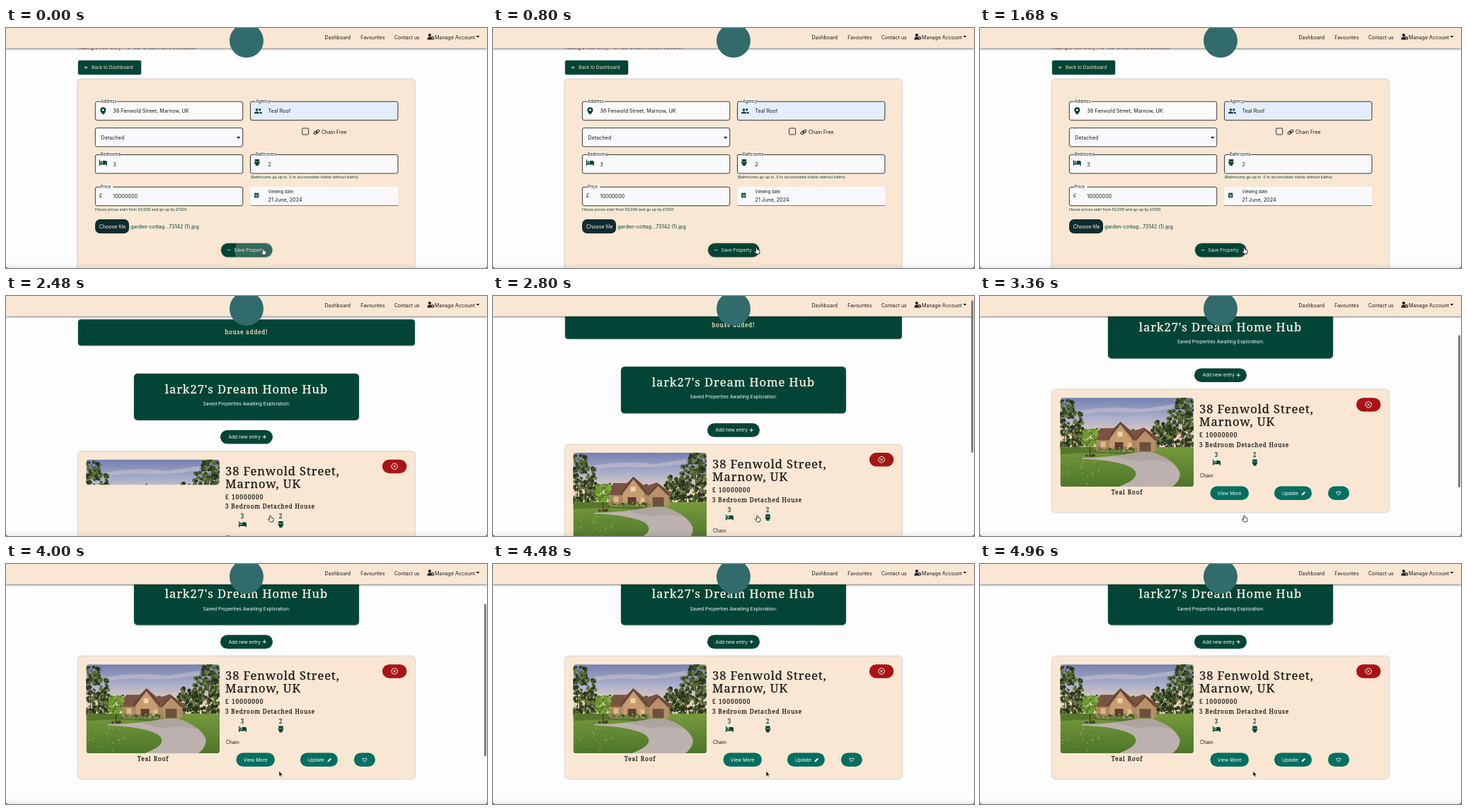
Recreate the animation shown at these times as an HTML page. Size 680 by 340 pixels, loop 5.04 s.

```html
<!DOCTYPE html>
<html lang="en">
<head>
<meta charset="utf-8">
<title>Property form to dashboard</title>
<style>
  html, body { margin: 0; width: 100%; height: 100%; overflow: hidden; background: #fdfdfd; }
  svg { display: block; width: 100vw; height: 100vh; }
  text { font-family: Inter, Roboto, sans-serif; white-space: pre; }
  .serif { font-family: "Noto Serif", serif; stroke-width: .25; }
  .raised { filter: drop-shadow(0 .7px .8px #0006); }
</style>
</head>
<body>
<svg id="stage" viewBox="0 0 680 340"></svg>
<script>
const LOOP = 5040, SWAP = 1920;
const GREEN = '#024536', TEAL = '#046f60', PEACH = '#f9e7d3', INK = '#181818', CREAM = '#fbe3c6';

const rect = (x, y, w, h, fill, r = 0, extra = '') =>
  `<rect x="${x}" y="${y}" width="${w}" height="${h}" rx="${r}" fill="${fill}" ${extra}/>`;
const text = (x, y, size, str, fill = INK, extra = '') =>
  `<text x="${x}" y="${y}" font-size="${size}" fill="${fill}" ${extra}>${str}</text>`;
const serif = (x, y, size, str, spacing, fill = INK, extra = '') =>
  text(x, y, size, str, fill, `class="serif" stroke="${fill}" letter-spacing="${spacing}" ${extra}`);
const path = (d, fill = 'none', extra = '') => `<path d="${d}" fill="${fill}" ${extra}/>`;
const line = (d, color, width = 1) => path(d, 'none', `stroke="${color}" stroke-width="${width}" stroke-linecap="round"`);
const circle = (x, y, r, fill, extra = '') => `<circle cx="${x}" cy="${y}" r="${r}" fill="${fill}" ${extra}/>`;
const at = (x, y, body) => `<g transform="translate(${x} ${y})">${body}</g>`;
const pill = (x, y, w, fill, extra) => rect(x, y, w, 19.5, fill, 9.75, extra);
const middle = 'text-anchor="middle"';
const raised = 'class="raised"';

const icons = {
  pin: path('M4 0a4 4 0 0 1 4 4c0 3-4 6.5-4 6.5S0 7 0 4a4 4 0 0 1 4-4z', GREEN) + circle(4, 4, 1.4, '#fff'),
  people: circle(3.5, 2, 1.8, GREEN) + circle(7.8, 2, 1.6, GREEN) +
    path('M0 7.5V6q3.5-3 7 0v1.5zM7.8 7.5V5q2.5 0 3.2 1.2v1.3z', GREEN),
  bed: path('M0 0h1.2v4.8h3.8v-3.6h4q2 0 2 2v5h-1.2v-1.6H1.2v1.6H0z', GREEN) + circle(3, 3, 1.3, GREEN),
  toilet: path('M.8 0h6.4v3.4h.8q0 2.6-1.8 3.6v2H1.8V7Q0 6 0 3.4h.8z', GREEN) + line('M1 3.6h6', '#fff', .5),
  calendar: rect(0, 1, 6.5, 6.5, GREEN, .8) + line('M1.7 .4v1M4.8 .4v1', GREEN) +
    line('M.6 2.9h5.3M.8 4.9h5M2.3 3.6v3M4.2 3.6v3', '#fff', .45),
  link: `<g fill="none" stroke="${INK}" transform="rotate(-35 4 4)">` +
    '<rect x="-.4" y="2.4" width="5" height="3.2" rx="1.6"/><rect x="3.4" y="2.4" width="5" height="3.2" rx="1.6"/></g>',
  user: circle(3.5, 2.1, 2.1, INK) + path('M0 8.5q0-4 3.5-4 1.5 0 2 .6v3.4z', INK) +
    circle(7.3, 6.4, 1.7, 'none', `stroke="${INK}" stroke-width="1.3"`),
  pencil: path('M0 6l.5-2L4 .5 5.5 2 2 5.5zM4.5 0L6 1.5', '#fff'),
  heart: path('M3 5.5Q-1.5 2 .8 .6 2.3 0 3 1.5 3.7 0 5.2 .6 7.5 2 3 5.5z', 'none', 'stroke="#fff" stroke-width=".9"')
};

function field(x, y, label, value, { icon = '', iconY = 8, fill = '#fdfbf9', textX = 25 } = {}) {
  const tag = label && rect(7, -4, label.length * 3 + 3, 6, '#fdfaf6') + text(7.5, 1.6, 5.8, label);
  return at(x, y, rect(0, 0, 208.5, 26.5, fill, 2.5, 'stroke="#222" stroke-width=".9"') + tag +
    at(5.5, iconY, icon) + text(textX, 16, 7.2, value));
}

function formPage() {
  const pale = '#f9f9fd';
  return text(102, 30.3, 6.6, 'Adding a new entry? To Your Dream Home’s Selection') +
    rect(102, 46, 89, 20, GREEN, 2, raised) +
    line('M111.5 56h4M111.5 56l1.7-1.7M111.5 56l1.7 1.7', CREAM, .8) +
    text(121, 58.3, 6.5, 'Back to Dashboard', CREAM) +
    rect(101.5, 72.5, 476.5, 290, PEACH, 5, raised) +
    field(126.3, 104.2, 'Address', '38 Fenwold Street, Marnow, UK', { icon: at(1.5, 0, icons.pin) }) +
    field(345.5, 104.2, 'Agency', 'Teal Roof', { icon: at(0, 1.5, icons.people), fill: '#e3edfb' }) +
    field(126.3, 141.6, '', 'Detached', { fill: pale, textX: 8 }) +
    path('M326 154h5.5l-2.75 3z', INK) +
    rect(418.7, 142, 9, 9, 'none', 1, 'stroke="#333"') + at(435, 143.5, icons.link) +
    text(446, 150.4, 7, 'Chain Free') +
    field(126.3, 179.5, 'Bedrooms', '3', { icon: at(0, -.7, icons.bed), fill: pale }) +
    field(345.5, 179.5, 'Bathrooms', '2', { icon: at(0, -.5, icons.toilet), iconY: 7, fill: pale }) +
    text(345.5, 213, 5.4, '(Bathrooms go up to .5 to accomodate toilets without baths)', GREEN) +
    field(126.3, 225.3, 'Price', '10000000', { icon: text(0, 6.8, 7.5, '£', GREEN), fill: pale }) +
    text(126, 258.7, 5.3, 'House prices start from 50,000 and go up by £1000', GREEN) +
    rect(345.5, 225, 208.5, 26.5, pale, 2) + line('M346 251.6h208', '#555', .8) +
    at(351, 233, icons.calendar) + text(370.5, 234.2, 5.8, 'Viewing date:') +
    text(370.5, 245.8, 7.2, '21 June, 2024') +
    rect(126, 271, 48, 20, '#112b30', 7) + text(131.8, 283.5, 7, 'Choose file', '#fff') +
    text(176, 283.5, 7.1, 'garden-cottag...73142 (1).jpg', GREEN) +
    pill(304, 305, 72.5, GREEN, raised) +
    '<g clip-path="url(#saveClip)"><circle id="ripple" cx="364" cy="317" fill="#fff"/></g>' +
    line('M313 314.7h4', CREAM, .8) + text(322.5, 316.8, 6.5, 'Save Property', CREAM);
}

function photo() {
  let seed = 7;
  const random = () => (seed = seed * 16807 % 2147483647) / 2147483647;
  const foliage = (count, x, y, w, h, colors, size = 3) => {
    let out = '';
    for (let i = 0; i < count; i++)
      out += circle((x + random() * w).toFixed(1), (y + random() * h).toFixed(1),
        (size * (.3 + random() * .7)).toFixed(1), colors[i % colors.length]);
    return out;
  };
  const woods = ['#2c3a22', '#3d5029', '#55692f', '#26331f', '#6b7a3c'];
  const bright = ['#6f9a30', '#86ad3e', '#56802b'];
  return rect(0, 0, 188.5, 126, 'url(#sky)') +
    path('M20 20q45-10 95-4l45-7v6q-50 8-85 5-25-1-55 6z', '#e6cfcb', 'opacity=".4"') +
    // Tree line behind the house, rising toward both sides
    foliage(150, 26, 44, 130, 22, woods) +
    foliage(200, 0, 20, 32, 52, woods) + foliage(60, 0, 3, 20, 24, woods) +
    foliage(90, 132, 34, 24, 38, woods) + foliage(220, 150, 18, 38, 54, woods) +
    foliage(60, 164, 1, 24, 24, woods) +
    line('M6 28V72M17 38V72M160 40V72M173 24V72M183 28V74', '#4b3b2c', .9) +
    // Lawn
    rect(0, 70, 188.5, 56, 'url(#lawn)') +
    path('M0 71Q60 66 112 76L95 81Q45 76 0 80z', '#4a6a26', 'opacity=".7"') +
    foliage(90, 0, 82, 60, 42, ['#83a446', '#57802e'], 1.2) +
    // House
    path('M50 55h86v21H50z', '#ab8764') +
    path('M46 57l11-14h19l9-9 17 14 16-6 21 15v3H46z', '#7a5443') +
    path('M70 58l15-20 16 20v18H70z', '#c79b72') +
    path('M108 60l12-13 13 13v16h-25z', '#b89069') +
    line('M67 58L85 35l19 22M106 60l14-15 15 15', '#603c30', 1.4) +
    rect(77, 63, 12, 11, '#57402f') + rect(81, 48, 7, 7, '#ecd3a0') +
    rect(57, 62, 7, 8, '#dcb882') + rect(112, 63, 16, 13, '#6b5240') +
    rect(95, 64, 6, 8, '#e6c083') +
    foliage(60, 50, 71, 60, 5, ['#3a5327', '#5c7a37', '#8d8b49'], 2) +
    // Driveway
    path('M30 85Q70 85 110 77H130Q162 88 169 106 170 118 158 126H84Q118 113 103 100 82 88 30 86.500z', '#bcb1ae') +
    path('M110 77H130Q150 83 158 92 132 86 108 90 92 87 78 83z', '#a59b98', 'opacity=".6"') +
    line('M103 100Q118 113 84 126', '#d3cac5', .8) +
    line('M42 62V80', '#4b3b27', 1.4) + foliage(110, 32, 46, 20, 22, bright, 2.6) +
    foliage(16, 36, 81, 13, 2, ['#453725', '#564029'], 1.8);
}

function dashboardPage() {
  const button = (x, w) => pill(x, 357, w, TEAL);
  return rect(102, 33.3, 476, 37, GREEN, 4, raised) +
    serif(340, 54, 8, 'house added!', .85, CREAM, middle) +
    rect(181, 110, 318, 66, GREEN, 5, raised) +
    serif(340, 137.8, 16.6, 'lark27\'s Dream Home Hub', .9, '#fff4e6', middle) +
    text(340, 155, 6.75, 'Saved Properties Awaiting Exploration:', '#fff', middle) +
    pill(303, 190, 74, GREEN) + text(314.5, 202, 6.6, 'Add new entry', '#fff') +
    line('M363 199.7h4.6M365.3 197.4v4.6', '#fff', .9) +
    rect(102, 220.3, 476, 173.5, PEACH, 5, raised) +
    `<g clip-path="url(#photoClip)">${at(113.5, 231.7, photo())}</g>` +
    serif(208, 368.5, 8.2, 'Teal Roof', .95, INK, middle) +
    serif(310, 253.5, 16.6, '38 Fenwold Street,', .9) + serif(310, 271.5, 16.6, 'Marnow, UK', .9) +
    serif(310, 287.7, 8.3, '£ 10000000', 1.05) +
    serif(310, 301.3, 8.2, '3 Bedroom Detached House', .8) +
    serif(334, 315.3, 8, '3', 0, GREEN, middle) + at(329, 319.3, icons.bed) +
    serif(388.3, 315.3, 8, '2', 0, GREEN, middle) + at(384.5, 319, icons.toilet) +
    text(311, 344.8, 6.9, 'Chain') +
    button(325.5, 54.5) + text(352.7, 369.2, 6.7, 'View More', '#fff', middle) +
    button(416, 53) + text(427, 369.2, 6.7, 'Update', '#fff') + at(454.5, 364, icons.pencil) +
    button(492, 30) + at(504, 364.2, icons.heart) +
    pill(532, 231.7, 34.5, '#a81416') +
    circle(549.2, 241.4, 4.3, 'none', 'stroke="#fff" stroke-width=".9"') +
    line('M547.6 239.8l3.2 3.2M550.8 239.8l-3.2 3.2', '#fff', .9);
}

const navBar = rect(0, -5, 680, 33.8, PEACH, 0, 'style="filter:drop-shadow(0 1px 1px #223a)"') +
  text(450.5, 16, 7.1, 'Dashboard') + text(501.3, 16, 7, 'Favourites') +
  text(549, 16, 7, 'Contact us') + at(595.5, 8, icons.user) +
  text(606, 16, 7.1, 'Manage Account') + path('M664.5 11h5l-2.5 2.7z', INK) +
  circle(340, 18, 24, '#326b6b');

const stage = document.getElementById('stage');
stage.innerHTML = `<defs>
  <linearGradient id="sky" x2="0" y2="1"><stop stop-color="#7380b0"/><stop offset=".22" stop-color="#a9aecb"/><stop offset=".45" stop-color="#f0d3bd"/></linearGradient>
  <linearGradient id="lawn" x2="0" y2="1"><stop stop-color="#76993c"/><stop offset="1" stop-color="#4c762a"/></linearGradient>
  <linearGradient id="edge" x2="0" y2="1"><stop stop-color="#000" stop-opacity="0"/><stop offset="1" stop-opacity=".06"/></linearGradient>
  <clipPath id="saveClip">${pill(304, 305, 72.5, '#000')}</clipPath>
  <clipPath id="photoClip"><rect id="photoWindow" x="113.5" y="231.7" width="188.5" rx="4"/></clipPath>
  </defs>${rect(0, 0, 680, 340, '#fdfdfd')}
  <g id="form">${formPage()}</g><g id="dashboard">${dashboardPage()}</g>${navBar}
  ${rect(0, 332, 680, 8, 'url(#edge)')}${path('M0 337q0 3 3 3H0zM680 337q0 3-3 3h3z', '#111')}
  <rect id="scrollbar" x="676" width="3" height="216" rx="1.5" fill="#7d7d7d"/>
  <g id="hand">${path('M-1.3-4q1-1 1.6.2l.5 2.2 2.3.5q1.2.4 1 1.9l-.7 3.6h-4.2l-2.7-3.3q-.3-1.2 1-.8l1.1.8z',
    '#fff', 'stroke="#111" stroke-width=".85" stroke-linejoin="round"')}</g>
  <g id="arrow">${path('M0 0v7.2l1.7-1.5 1.2 2.5 1.3-.6-1.2-2.4h2.3z', '#111', 'stroke="#fff" stroke-width=".5"')}</g>`;

const el = id => document.getElementById(id);
const set = (id, name, value) => el(id).setAttribute(name, value);
const show = (id, visible) => set(id, 'visibility', visible ? 'visible' : 'hidden');
const progress = (t, from, to) => Math.min(1, Math.max(0, (t - from) / (to - from)));
const smooth = p => p * p * (3 - 2 * p);
const move = (id, x, y) => set(id, 'transform', `translate(${x} ${y})`);

function render(t) {
  show('form', t < SWAP);
  show('dashboard', t >= SWAP);

  set('ripple', 'r', 40 + 45 * progress(t, 0, 240));
  set('ripple', 'opacity', .2 * (1 - progress(t, 160, 560)));

  const scroll = 89.5 * smooth(progress(t, 2640, 3430));
  move('dashboard', 0, -scroll);
  set('photoWindow', 'height', t < 2240 ? 0 : t < 2560 ? 35.5 : 126);

  set('scrollbar', 'y', Math.max(2, scroll * .63));
  set('scrollbar', 'opacity', progress(t, 2640, 2720) * (1 - progress(t, 4160, 4400)));

  const slide = smooth(progress(t, 480, 880));
  const leave = progress(t, 3840, 4000);
  move('hand', 364 + 10 * slide + 13 * leave, 317 - 1.5 * slide - 19 * leave);
  move('arrow', 386, 293.5);
  show('hand', leave < 1);
  show('arrow', leave === 1);
}

function tick() {
  render(performance.now() % LOOP);
  requestAnimationFrame(tick);
}
tick();
</script>
</body>
</html>
```
